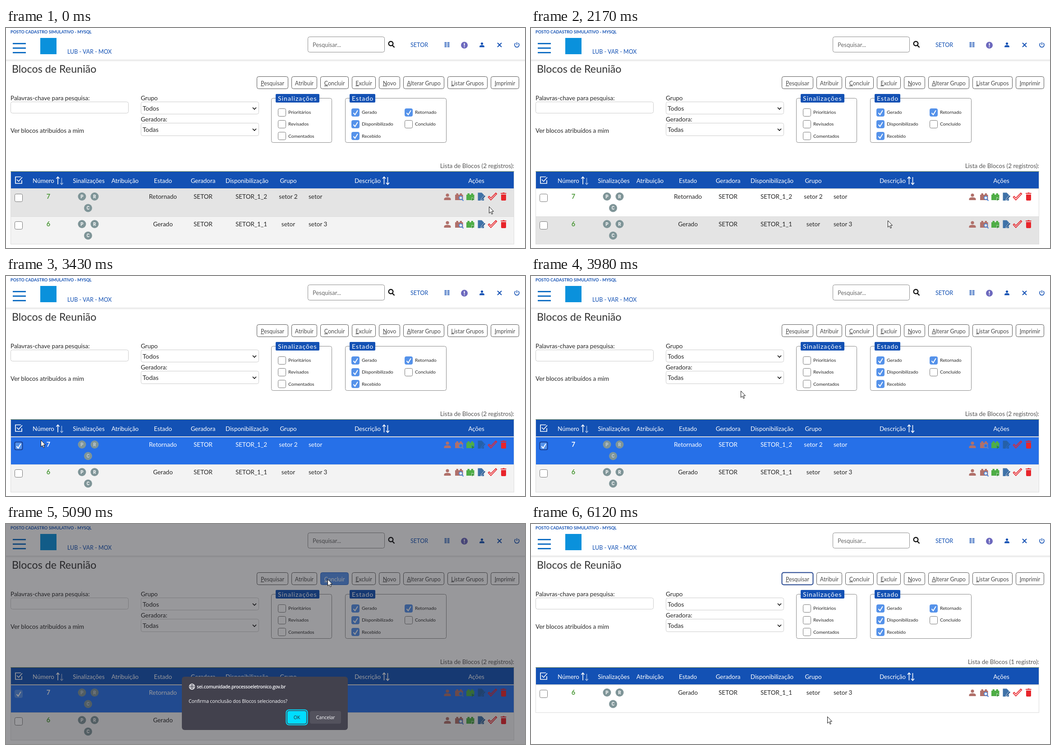
An HTML page for the animation above (6930 ms loop, 1151 by 487 pixels).

```html
<!DOCTYPE html>
<html lang="pt-BR">
<head>
<meta charset="utf-8">
<title>Blocos de Reunião</title>
<style>
html, body { margin: 0; width: 100%; height: 100%; overflow: hidden; background: #fff; }
svg { display: block; }
text { font: 13.5px Lato, "Open Sans", sans-serif; fill: #262626; white-space: pre; }
.mid { text-anchor: middle; }
.end { text-anchor: end; }
.blue { fill: #1351b4; }
.box { fill: #fff; stroke: #ccc; }
.frame { fill: none; stroke: #8a8a8a; }
.line { fill: none; stroke: #1351b4; stroke-width: 1.6; }
.legend { font-size: 14px; letter-spacing: 1.1px; fill: #fff; }
.small { font-size: 10.4px; }
.list { fill: #555; }
.btn rect { fill: #fff; stroke: #555; }
.btn text { font-size: 12.4px; fill: #4a4a4a; }
.btn tspan { text-decoration: underline; }
.check rect { fill: #fff; stroke: #777; }
.check path { display: none; fill: none; stroke: #fff; stroke-width: 2; stroke-linecap: round; }
.check.on rect, .picked #r7 .check rect { fill: #5592ea; stroke: #5592ea; }
.check.on path, .picked #r7 .check path { display: inline; }
.head text { fill: #fff; font-size: 13.4px; }
.sort { fill: none; stroke: #fff; stroke-width: 1.6; }
.num { font-weight: 700; fill: #4f9a3c; font-size: 14.5px; }
.flag circle { fill: #7f9598; }
.flag text { font: 700 10px Roboto, sans-serif; fill: #fff; }
#r7 { --row: #fff; }
#r6 { --row: #f3f3f3; }
.h7 #r7, .h6 #r6 { --row: #e4e4e4; }
.picked #r7 { --row: #2670e8; }
.bg { fill: var(--row); }
.picked #r7 > text { fill: #fff; }
.picked #r7 .flag text { fill: #c3cdd6; }
.picked #r7 .doc { fill: #2560a8; }
.ring #r7 .check rect { stroke: #173f94; stroke-width: 2; }
.link #r7 .num { text-decoration: underline; }
.icon #r7 .done-icon { opacity: .7; }
.done #r6 { --row: #fff; transform: translateY(-61px); }
.done #r7, .done .two, .one { display: none; }
.done .one { display: inline; }
.press #Concluir rect { fill: #5592ea; stroke: #2a66c8; }
.press #Concluir text { fill: #fff; }
.done #Pesquisar rect { stroke: #23458f; stroke-width: 2; }
#tip, #dialog, #dot, #hand { display: none; }
.tip #tip, .ask #dialog, .dot #dot, .hand #hand { display: inline; }
.hand #arrow { display: none; }
.ui text, #tip text { font: 10.6px "Open Sans", "Noto Sans", sans-serif; letter-spacing: -.15px; }
.ui text { fill: #fbfbfe; }
.ui .host { font-weight: 600; font-size: 10.4px; letter-spacing: -.35px; }
.ui .dark { fill: #2b2a33; }
.ok { fill: #00ddff; }
.okhover .ok { fill: #aaf2ff; }
#cursor path { fill: #fff; stroke: #111; stroke-linejoin: round; }
</style>
</head>
<body>
<svg id="stage" width="1151" height="487" viewBox="0 0 1151 487">
  <defs>
    <linearGradient id="shade" x2="0" y2="1">
      <stop stop-color="#e2e2e2"/><stop offset="1" stop-color="#fff"/>
    </linearGradient>
    <g id="user"><circle cy="-4" r="3.6"/><path d="M-7.5 7V4.5C-7.5 1.8-3 .8 0 .8s7.5 1 7.5 3.7V7z"/></g>
    <path id="brick" d="M-9-5h2.5v-3h4.5v3h3.5v-3h4.5v3H8.5V7H-9z"/>
    <path id="sort" d="M0 8V-8M-3.5-4.500 0-8.500 3.500-4.500"/>
  </defs>

  <g id="page">
    <rect y="70" width="1151" height="5" fill="url(#shade)"/>
    <text class="blue" x="10" y="12" style="font-size:9.2px;font-weight:700">POSTO CADASTRO SIMULATIVO - MYSQL</text>
    <path d="M15 34.5H44M15 44.5H44M15 54.5H44" stroke="#1470c4" stroke-width="3"/>
    <rect x="76" y="22" width="36" height="36" fill="#0a91dc"/>
    <text class="blue" x="136" y="57" style="font-size:12.5px">LUB - VAR - MOX</text>

    <rect x="669.5" y="19.5" width="170" height="34" rx="4" fill="#fff" stroke="#8c8c8c"/>
    <text x="680" y="42" style="font-size:13px;fill:#666">Pesquisar...</text>
    <g fill="none" stroke="#111" stroke-width="2.4"><circle cx="853.5" cy="34.5" r="4.8"/><path d="M857 38.5 861.5 43"/></g>
    <text class="blue" x="897" y="42" style="font-size:12.6px">SETOR</text>
    <path d="M978 31.5V43" stroke="#1351b4" stroke-width="11" stroke-dasharray="1.7 1.3"/>
    <path d="M978 31V43" stroke="#fff" stroke-width="1.5"/>
    <circle cx="1016.5" cy="38" r="7.5" fill="#6c68bd"/>
    <path d="M1016.5 33.5v5.5m0 1.5v2" stroke="#fff" stroke-width="2"/>
    <use href="#user" class="blue" transform="translate(1055.5 37.5) scale(.72)"/>
    <path class="line" d="m1090 33 9 9m0-9-9 9" style="stroke-width:2"/>
    <path class="line" d="M1130 33.5a5 5 0 1 0 6 0M1133 31.5v6"/>

    <text x="13" y="99" style="font-size:23.3px;fill:#333">Blocos de Reunião</text>
    <g id="buttons"></g>

    <text x="10" y="160">Palavras-chave para pesquisa:</text>
    <rect class="box" x="10.5" y="163.5" width="261" height="25" rx="4"/>
    <text x="10" y="232">Ver blocos atribuídos a mim</text>
    <text x="299" y="160">Grupo</text>
    <rect class="box" x="299.5" y="163.5" width="261" height="27" rx="4"/>
    <text x="303" y="183" style="font-size:14px">Todos</text>
    <text x="299" y="207">Geradora:</text>
    <rect class="box" x="299.5" y="210.5" width="261" height="28" rx="4"/>
    <text x="303" y="230" style="font-size:14px">Todas</text>
    <path d="m547 176 4 4 4-4m-8 47 4 4 4-4" fill="none" stroke="#111" stroke-width="1.7"/>

    <rect class="frame" x="588.5" y="155.5" width="134" height="98" rx="4"/>
    <rect class="blue" x="598" y="146" width="97" height="19" rx="2"/>
    <text class="legend" x="603" y="161">Sinalizações</text>
    <rect class="frame" x="752.5" y="155.5" width="224" height="98" rx="4"/>
    <rect class="blue" x="762" y="146" width="57" height="19" rx="2"/>
    <text class="legend" x="767" y="161">Estado</text>
    <g id="filters"></g>

    <text class="end two list" x="1127" y="310">Lista de Blocos (2 registros):</text>
    <text class="end one list" x="1127" y="310">Lista de Blocos (1 registro):</text>

    <g class="head">
      <rect x="10.5" y="317.5" width="1116" height="38" fill="#1351b4" stroke="#dcdcdc"/>
      <path d="M10 317.5H1127" stroke="#8c9c58"/>
      <path d="M33 329.5H21V344H35V337M24 335.5l4 4 8-9" fill="none" stroke="#fff" stroke-width="1.7"/>
      <g id="heads"></g>
      <g class="sort">
        <use href="#sort" x="115" y="338"/>
        <use href="#sort" transform="translate(123.5 339) rotate(180) scale(.9)" opacity=".6"/>
        <use href="#sort" x="838.5" y="338"/>
        <use href="#sort" transform="translate(846.5 338) rotate(180)"/>
      </g>
    </g>
    <g id="rows"></g>
    <g id="tip">
      <rect x="1076.5" y="398.5" width="74" height="19" fill="#fff" stroke="#777"/>
      <text x="1080" y="412">Concluir Bloco</text>
    </g>
  </g>

  <g id="dialog" class="ui">
    <rect width="1151" height="487" fill="#1c1b22" opacity=".45"/>
    <rect x="390" y="338" width="368" height="118" rx="6" fill="#42414d"/>
    <g fill="none" stroke="#fbfbfe" stroke-width="1.2">
      <circle cx="412.5" cy="360" r="6"/><ellipse cx="412.5" cy="360" rx="2.7" ry="6"/><path d="M406.5 358h12m-12 4h12"/>
    </g>
    <text class="host" x="423" y="364">sei.comunidade.processoeletronico.gov.br</text>
    <text x="405" y="396">Confirma conclusão dos Blocos selecionados?</text>
    <rect x="621.5" y="411.5" width="47" height="33" rx="6" fill="none" stroke="#00ddff" stroke-width="2"/>
    <rect class="ok" x="624" y="414" width="42" height="28" rx="4"/>
    <text class="mid dark" x="645" y="432">OK</text>
    <rect x="674" y="414" width="69" height="28" rx="4" fill="#53525d"/>
    <text class="mid" x="708.5" y="432">Cancelar</text>
  </g>

  <g id="cursor">
    <circle id="dot" r="10.5" cy="1" fill="#f0f028" opacity=".7"/>
    <path id="arrow" d="M.5.5V15L3.8 11.9 6.2 17.2 8.4 16.2 6.1 11H10.5z"/>
    <path id="hand" d="M-1.5 12.5V2a1.7 1.7 0 0 1 3.4 0V8q1.6-1.5 3 .3 1.7-1.2 2.9.6 2.2-.8 2.7 1.3V15L8.8 18.5V21.5H.2V19.5L-4.5 13Q-5.5 10.5-3.2 10.7z"/>
  </g>
</svg>

<script>
const LOOP = 6930, STEP = 70;
const $ = id => document.getElementById(id);
const fill = (id, items, draw) => $(id).innerHTML = items.map(draw).join('');
const mid = (x, y, s) => `<text class="mid" x="${x}" y="${y}">${s}</text>`;
const check = (x, y, on) => `<g class="check ${on ? 'on' : ''}" transform="translate(${x} ${y})">
  <rect x=".5" y=".5" width="17" height="17" rx="3"/><path d="M5 10.5 8 14 13.5 5"/></g>`;

// label, left, right, has access key
fill('buttons', [
  ['Pesquisar', 556, 626, 1], ['Atribuir', 633, 690, 0], ['Concluir', 697, 760, 1], ['Excluir', 767, 820, 1],
  ['Novo', 827, 874, 1], ['Alterar Grupo', 881, 972, 1], ['Listar Grupos', 979, 1068, 1], ['Imprimir', 1075, 1138, 1]
], ([s, a, b, key]) => `<g class="btn" id="${s.replace(' ', '')}">
  <rect x="${a + .5}" y="107.5" width="${b - a - 1}" height="27" rx="4"/>
  ${mid((a + b) / 2, 126.5, key ? `<tspan>${s[0]}</tspan>${s.slice(1)}` : s)}</g>`);

fill('filters', [
  ['Prioritários', 603, 0, 0], ['Revisados', 603, 1, 0], ['Comentados', 603, 2, 0],
  ['Gerado', 766, 0, 1], ['Disponibilizado', 766, 1, 1], ['Recebido', 766, 2, 1],
  ['Retornado', 884, 0, 1], ['Concluído', 884, 1, 0]
], ([s, x, i, on]) => check(x, 178 + i * 26, on) +
  `<text class="small" x="${x + 23}" y="${189.5 + i * 26.5}">${s}</text>`);

fill('heads', [
  ['Número', 83], ['Sinalizações', 183.5], ['Atribuição', 264], ['Estado', 348], ['Geradora', 437],
  ['Disponibilização', 534.5], ['Grupo', 626], ['Descrição', 802], ['Ações', 1043]
], ([s, x]) => mid(x, 343, s));

const flag = ([s, x, y]) => `<g class="flag"><circle cx="${x}" cy="${y}" r="9"/>${mid(x, y + 3.5, s)}</g>`;

const actions = `<g>
  <use href="#user" x="979" y="374" fill="#b0706a"/>
  <use href="#brick" x="1005" y="374" fill="#b0706a"/>
  <circle cx="1008.5" cy="376" r="3.6" fill="var(--row)" stroke="#4a86d8" stroke-width="1.7"/>
  <path d="m1011 379 3.5 3.5" stroke="#4a86d8" stroke-width="2"/>
  <use href="#brick" x="1030" y="374" fill="#4fae46"/>
  <path d="m1033 375 6.5 4-6.5 4z" fill="#2f8a2c" stroke="var(--row)" stroke-width=".8"/>
  <path class="doc" d="M1046.5 364.5h8.5l5 5V382h-13.5z" fill="#3f72a8"/>
  <path class="doc" d="m1053 382 1-4 7-8 2.5 2.2-7 8z" fill="#2e5c92" stroke="var(--row)" stroke-width=".8"/>
  <path class="done-icon" d="m1069.5 374.5 2-2 3.8 3.8 11-11 2 2-13 13.5z" fill="none" stroke="#e8252b" stroke-width="1.7"/>
  <path d="M1097 367v-1.7h4l1-1h3l1 1h3.5v1.7zM1098 368.5h11V380q0 2-2 2h-7q-2 0-2-2z" fill="#e8252b"/>
</g>`;

fill('rows', [
  [7, 0, 'Retornado', 'SETOR_1_2', 'setor 2', 'setor'],
  [6, 61, 'Gerado', 'SETOR_1_1', 'setor', 'setor 3']
], ([n, y, state, unit, group, desc]) => `<g transform="translate(0 ${y})"><g id="r${n}">
  <rect class="bg" x="10.5" y="356.5" width="1116" height="61" stroke="#dcdcdc"/>
  ${check(19, 367)}<text class="mid num" x="94" y="378">${n}</text>
  ${[['P', 168.5, 373], ['R', 196.5, 373], ['C', 182, 398.5]].map(flag).join('')}
  ${mid(348, 378, state)}${mid(437, 378, 'SETOR')}${mid(544, 378, unit)}${mid(626, 378, group)}
  <text x="671" y="378">${desc}</text>${actions}</g></g>`);

// time, x, y of the pointer's hot spot
const path = [
  [0, 1071, 395], [260, 1071, 395], [540, 1076, 379], [1750, 1076, 379], [2170, 791, 426],
  [2460, 460, 408], [2810, 83, 375], [3080, 28, 377], [3360, 28, 377], [3980, 465, 254],
  [4740, 713, 122], [5090, 713, 122], [5640, 655, 402], [5840, 657, 426], [LOOP, 657, 426]
];
// class name with the spans in which it holds
const states = {
  h7: [[0, 2100], [2310, 3290]],
  h6: [[2100, 2310]],
  icon: [[470, 1820]],
  tip: [[960, 1820]],
  hand: [[760, 1820], [2810, 2950], [4810, 5090]],
  link: [[2810, 2950]],
  picked: [[3290, 6120]],
  ring: [[3290, 4960]],
  press: [[4740, 6120]],
  dot: [[3290, 3430], [4960, 5090], [5980, 6120]],
  ask: [[5090, 6120]],
  okhover: [[5780, 6120]],
  done: [[6120, LOOP]]
};

function pointer(t) {
  const i = path.findIndex(p => p[0] > t);
  const [a, x0, y0] = path[i - 1], [b, x1, y1] = path[i];
  const p = Math.floor((t - a) / STEP) * STEP / (b - a);
  return [x0 + (x1 - x0) * p, y0 + (y1 - y0) * p].map(Math.round);
}

function draw(now) {
  const t = now % LOOP;
  $('cursor').setAttribute('transform', `translate(${pointer(t)})`);
  const active = Object.keys(states).filter(k => states[k].some(([a, b]) => t >= a && t < b));
  $('stage').setAttribute('class', active.join(' '));
}

const start = performance.now();
(function tick() {
  draw(performance.now() - start);
  requestAnimationFrame(tick);
})();
</script>
</body>
</html>
```
